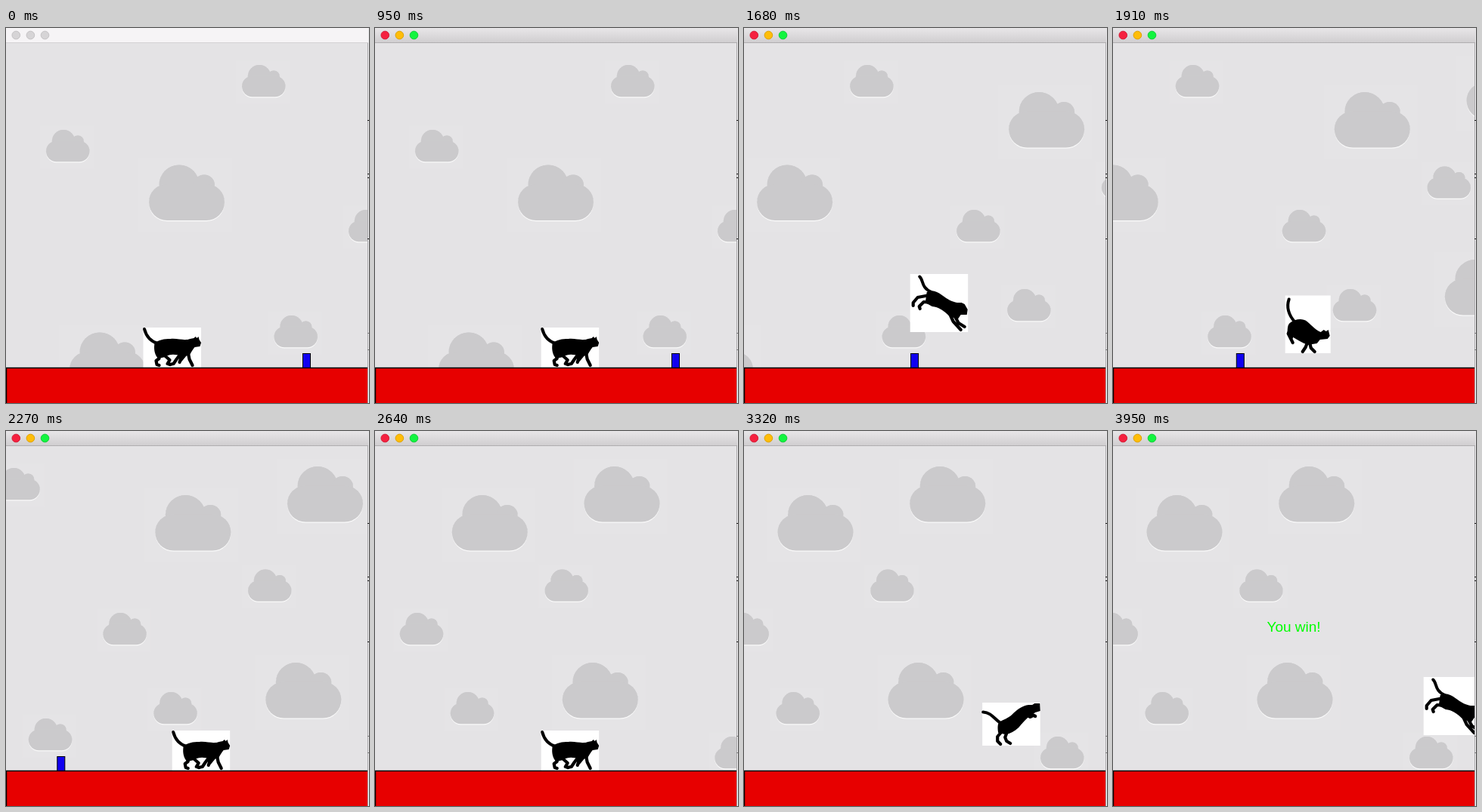
An HTML page that plays this animation: 480 by 497 pixels, repeating every 4100 ms.

```html
<!DOCTYPE html>
<html lang="en">
<head>
<meta charset="utf-8">
<title>Cat runner</title>
<style>
  html, body { margin: 0; width: 100%; height: 100%; overflow: hidden; background: #e4e3e5; }
  svg { display: block; width: 480px; height: 497px; }
  .tail { fill: none; stroke: #000; stroke-width: 4; stroke-linecap: round; }
  .leg { fill: none; stroke: #000; stroke-width: 4.2; stroke-linecap: round; stroke-linejoin: round; }
  .win { font: 19px "Liberation Sans", Arial, sans-serif; fill: #0f0; }
</style>
</head>
<body>
<svg viewBox="0 0 480 497">
  <defs>
    <linearGradient id="bar" x2="0" y2="1">
      <stop stop-color="#e8e6e8"/><stop offset="1" stop-color="#d0ced0"/>
    </linearGradient>
    <clipPath id="window"><path d="M0 0H478V497H0z"/></clipPath>
    <g id="cloud">
      <path d="M-14-10h124v99h-124z" fill="#e5e4e6"/>
      <g id="puff">
        <circle cx="40" cy="26.5" r="26.5"/>
        <circle cx="73" cy="27" r="14"/>
        <rect y="25.5" width="100" height="48" rx="24"/>
      </g>
    </g>
  </defs>
  <rect width="480" height="497" fill="#e4e3e5"/>
  <g clip-path="url(#window)">
    <g id="clouds" fill="#cbcacc"></g>
    <rect id="block" x="392.5" y="431.5" width="10" height="19" fill="#1000f0" stroke="#000"/>
    <g id="cat">
      <g data-pose="walk">
        <rect y="397" width="76.5" height="53" fill="#fff"/>
        <g transform="translate(0 397)">
          <path class="tail" d="M1.5 2C4 12 9 18 19 21"/>
          <path d="M15 21C20 16 28 15 36 15C46 14 54 18 62 15L67 14L69 12L71 14L73 12L74 16L76.5 20L75 25L68 26C65 30 63 33 61 37L50 38C42 35 35 35 29 39L20 41C14 36 14 26 15 21z"/>
          <path class="leg" d="M20 36L21 41L17 44L18 49L21 50M26 35L35 43L32 48L36 49M50 34L44 42L40 48L35 49M55 33L50 40L48 46M58 33L49 44M59 32L61 42L65 50"/>
        </g>
      </g>
      <g data-pose="leap">
        <rect y="360" width="76.5" height="57" fill="#fff"/>
        <g transform="translate(0 360)">
          <path class="tail" d="M1 12.5C12 13 16 22 24 27"/>
          <path d="M22 26C28 22 34 21 39 16C46 9 53 4 61 3L66 3L69 1L76 1L76.5 11L70 13L64 17C58 21 53 27 48 33C42 38 38 41 30 42L21 40C20 34 20 29 22 26z"/>
          <path class="leg" d="M26 38L20 45L20 51L24 55M33 38L30 46L32 51L37 54M58 16L63 19L67 17M62 14L70 18"/>
        </g>
      </g>
      <g data-pose="glide">
        <rect y="326" width="76.5" height="77" fill="#fff"/>
        <g transform="translate(0 326)">
          <path class="tail" d="M12.5 3.5C18 8 14 18 28 24"/>
          <path d="M22 24C28 20 36 23 42 28C50 34 56 37 62 38L68 38L72 40L76 47L75 54L67 54L63 60L52 56C44 48 38 44 29 43L20 38z"/>
          <path class="leg" d="M26 28L10 31L4 38L4 42M27 38L18 37L12 43L13 46M51 50L57 63L67 74M58 54L64 65L72 70"/>
        </g>
      </g>
      <g data-pose="land">
        <rect x="8" y="354.5" width="60" height="76.5" fill="#fff"/>
        <g transform="translate(8 355)">
          <path class="tail" d="M5 4.500C1 16 6 27 13 35"/>
          <path d="M6 36C13 31 22 29 29 34C36 40 41 46 47 48L51 45L54 47L57 45L59 53L56 57L46 58L42 63L30 65C22 62 14 57 9 54L3 49C3 44 3 39 6 36z"/>
          <path class="leg" d="M7 43L4 50L10 62M10 48L8 56M30 60L27 68L23 74M32 60L34 69L39 74"/>
        </g>
      </g>
    </g>
    <path d="M0 450H478V497H0z" fill="#e70000"/>
    <path d="M0.500 497V450.500H478" fill="none" stroke="#000" stroke-width="1.4"/>
    <text id="win" class="win" x="203.500" y="266">You win!</text>
  </g>
  <path d="M478 20h2v477h-2z" fill="#f0eff1"/>
  <path d="M478.500 20V497" stroke="#a9a8aa"/>
  <path d="M478 122.500h2m-2 71h2m-2 5h2m-2 81h2" stroke="#000"/>
  <path d="M478 404.500h2m-2 22h2" stroke="#777"/>
  <rect id="title" width="479" height="19"/>
  <path id="edge" d="M0 19.500H479"/>
  <g id="lights"></g>
</svg>
<script>
const LOOP = 4100;
const STEP = 19.1;
const ACTIVE_AT = 230;
const WIN_AT = 3950;

// Moments of each key press; the cat walks, then the world scrolls, then the cat walks on.
const presses = [
  450, 950,
  1050, 1140, 1230, 1270, 1360, 1450, 1540, 1590, 1680, 1770, 1820, 1910,
  2000, 2090, 2140, 2230, 2270, 2360, 2410, 2500, 2590, 2640, 2730, 2820, 2910,
  3000, 3090, 3180, 3230, 3320, 3410, 3500, 3590, 3680, 3770
];
const LEAD = 2, SCROLLS = 25;

const poses = [
  [0, "walk"], [1270, "leap"], [1540, "glide"], [1820, "land"], [2090, "walk"],
  [3180, "leap"], [3500, "glide"]
];

const BIG = 1, SMALL = 0.575;
const cloudList = [
  [312, 49, SMALL], [53, 135, SMALL], [189, 181.5, BIG], [453, 241, SMALL],
  [84, 403.5, BIG], [354.5, 381, SMALL], [522, 85, BIG], [520, 346, SMALL],
  [696.7, 47, BIG], [644.7, 183.5, SMALL], [668, 307, BIG], [869.5, 405, SMALL]
];
const lightColors = [["#f5213f", "#d31a35"], ["#ffbd08", "#dca000"], ["#12f53f", "#0fca35"]];

const $ = id => document.getElementById(id);

function add(parent, tag, attrs) {
  const node = document.createElementNS("http://www.w3.org/2000/svg", tag);
  for (const key in attrs) node.setAttribute(key, attrs[key]);
  return parent.appendChild(node);
}

for (const [x, y, scale] of cloudList) {
  const group = add($("clouds"), "g", { transform: `translate(${x} ${y}) scale(${scale})` });
  add(group, "use", { href: "#cloud" });
  add(group, "use", { href: "#puff", fill: "#fafafa", y: 1.3 / scale });
  add(group, "use", { href: "#puff" });
}
const lights = lightColors.map((_, i) =>
  add($("lights"), "circle", { cx: 13.3 + 19.1 * i, cy: 9.5, r: 5.3 }));
const poseNodes = [...document.querySelectorAll("[data-pose]")];

const clamp = (value, low, high) => Math.min(high, Math.max(low, value));
const shift = (node, x) => node.setAttribute("transform", `translate(${x} 0)`);

function draw(time) {
  const count = presses.filter(t => t <= time).length;
  const scrolled = clamp(count - LEAD, 0, SCROLLS);
  shift($("clouds"), -scrolled * STEP);
  shift($("block"), -scrolled * STEP);
  shift($("cat"), 181.5 + (count - scrolled) * STEP);

  const pose = poses.filter(([t]) => t <= time).pop()[1];
  for (const node of poseNodes) node.style.display = node.dataset.pose === pose ? "" : "none";

  const active = time >= ACTIVE_AT;
  $("title").setAttribute("fill", active ? "url(#bar)" : "#f6f4f6");
  $("edge").setAttribute("stroke", active ? "#b0aeb0" : "#d3d1d3");
  lights.forEach((light, i) => {
    const [fill, stroke] = active ? lightColors[i] : ["#d6d4d6", "#c3c1c3"];
    light.setAttribute("fill", fill);
    light.setAttribute("stroke", stroke);
  });
  $("win").style.display = time >= WIN_AT ? "" : "none";
}

const start = performance.now();
function tick() {
  draw((performance.now() - start) % LOOP);
  requestAnimationFrame(tick);
}
tick();
</script>
</body>
</html>
```
